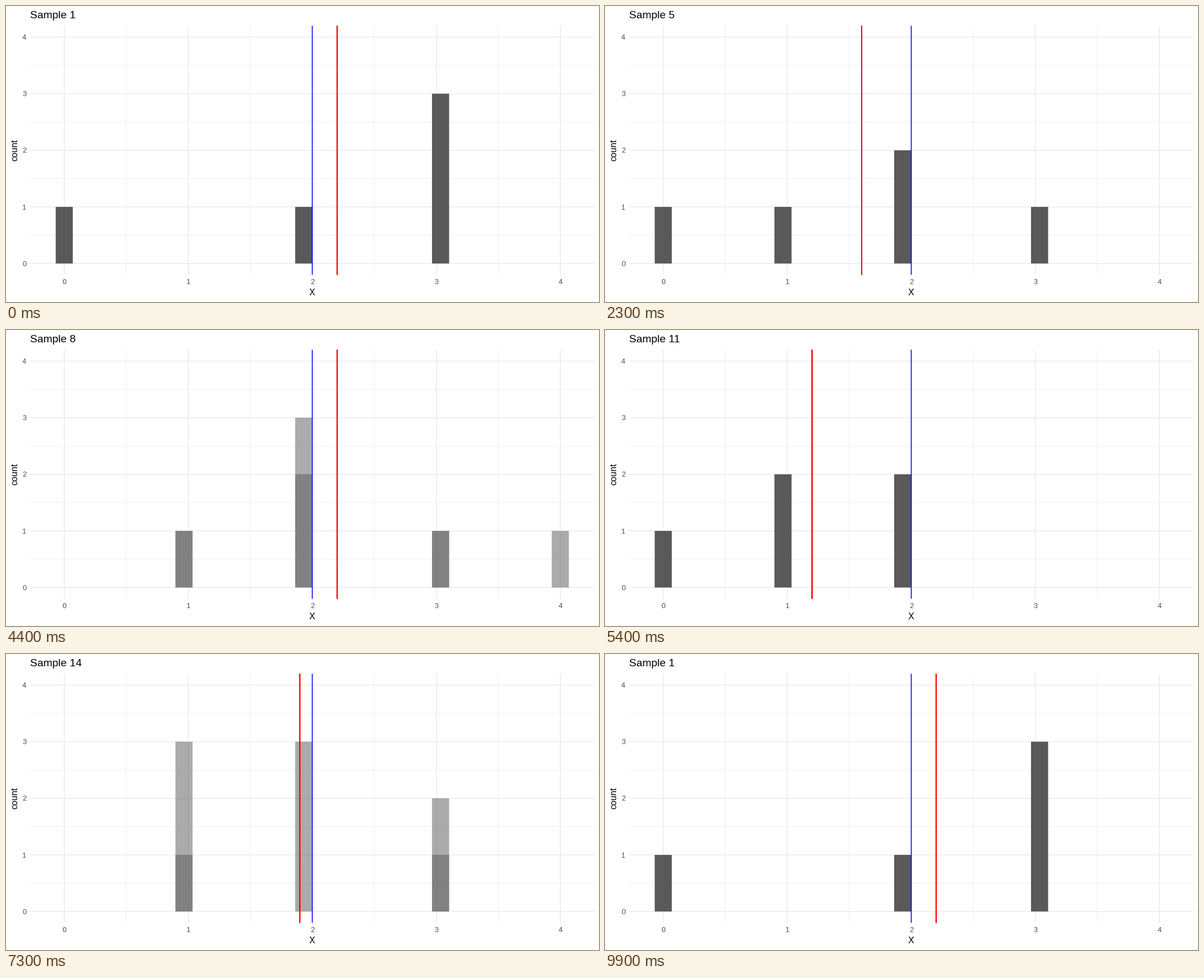
Recreate the animation shown at these times as a matplotlib script. Size 1058x529 px, loop 10 s.

```python
import matplotlib.pyplot as plt
from matplotlib.animation import FuncAnimation
from matplotlib.patches import Rectangle

W, H, DPI = 1058, 529, 64
LEFT, RIGHT, TOP, BOTTOM = 42.9, 1050, 35.3, 480.4
X0, X_UNIT = 103.95, 221.25
Y0, Y_UNIT = 460.2, 101.16
BIN = 4 / 29
BIN_INDEX = [0, 7, 14, 22, 29]
LINE = 1.556
FRAMES = 100

# Five draws per sample, each from 0 to 4.
SAMPLES = """02333 11223 01234 12233 01223 12233 12222 12223 12234 00112
01122 11233 01333 12223 11133 12223 00114 01344 11223""".split()

# Frames that show two neighbouring samples half faded.
FADES = [4, 10, 16, 22, 28, 34, 39, 44, 49, 53,
         58, 63, 68, 73, 78, 83, 88, 93, 98]

plt.rcParams["font.family"] = "Liberation Sans"


def pt(pixels):
    return pixels * 72 / DPI


def x_pos(value):
    return X0 + X_UNIT * value


def y_pos(count):
    return Y0 - Y_UNIT * count


def mean(sample):
    return sum(map(int, sample)) / len(sample)


fig = plt.figure(figsize=(W / DPI, H / DPI), dpi=DPI, facecolor="white")
ax = fig.add_axes([0, 0, 1, 1])
ax.set_xlim(0, W)
ax.set_ylim(H, 0)
ax.axis("off")


def line(xs, ys, color, width, z):
    return ax.plot(xs, ys, color=color, lw=pt(width), zorder=z, snap=False,
                   solid_capstyle="butt")[0]


def vertical(value, color, width, z):
    return line([x_pos(value)] * 2, [TOP, BOTTOM], color, width, z)


def label(x, y, text, size, color="black", **kwargs):
    return ax.text(x, y, text, fontsize=pt(size), color=color,
                   va="baseline", **kwargs)


def make_bars():
    bars = []
    for index in BIN_INDEX:
        left = x_pos((index - 0.5) * BIN)
        bar = Rectangle((left, Y0), BIN * X_UNIT, 0, facecolor="#595959",
                        linewidth=0, zorder=3, snap=False)
        bars.append(ax.add_patch(bar))
    return bars


def show_sample(bars, sample, alpha):
    for value, bar in enumerate(bars):
        bar.set_height(-Y_UNIT * sample.count(str(value)))
        bar.set_alpha(alpha)


for half in range(9):
    major = half % 2 == 0
    width, z = (LINE, 2) if major else (LINE / 2, 1)
    value = half / 2
    line([LEFT, RIGHT], [y_pos(value)] * 2, "#EBEBEB", width, z)
    vertical(value, "#EBEBEB", width, z)
    if major:
        tick = str(half // 2)
        label(x_pos(value), 497, tick, 12.83, "#4D4D4D", ha="center")
        label(36.3, y_pos(value) + 4.6, tick, 12.83, "#4D4D4D", ha="right")

label(x_pos(2), 517, "X", 16.04, ha="center")
label(20, y_pos(2), "count", 16.04, ha="center", rotation=90,
      rotation_mode="anchor")
title = label(LEFT, 22, "", 19.25, ha="left")

old_bars, new_bars = make_bars(), make_bars()
# One mean line per observation, so the edges build up.
mean_lines = [vertical(0, "red", LINE, 4) for _ in range(5)]
vertical(2, "blue", LINE, 5)


def update(frame):
    current = sum(f < frame for f in FADES) % len(SAMPLES)
    old = SAMPLES[current]
    fading = frame in FADES
    new = SAMPLES[(current + 1) % len(SAMPLES)] if fading else old

    show_sample(old_bars, old, 0.5 if fading else 1)
    show_sample(new_bars, new, 0.5 if fading else 0)
    center = x_pos((mean(old) + mean(new)) / 2)
    for mean_line in mean_lines:
        mean_line.set_xdata([center, center])
    title.set_text(f"Sample {current + 1}")
    return [title, *old_bars, *new_bars, *mean_lines]


anim = FuncAnimation(fig, update, frames=FRAMES, interval=100, repeat=True,
                     repeat_delay=0, init_func=lambda: update(0))
plt.show()
```
